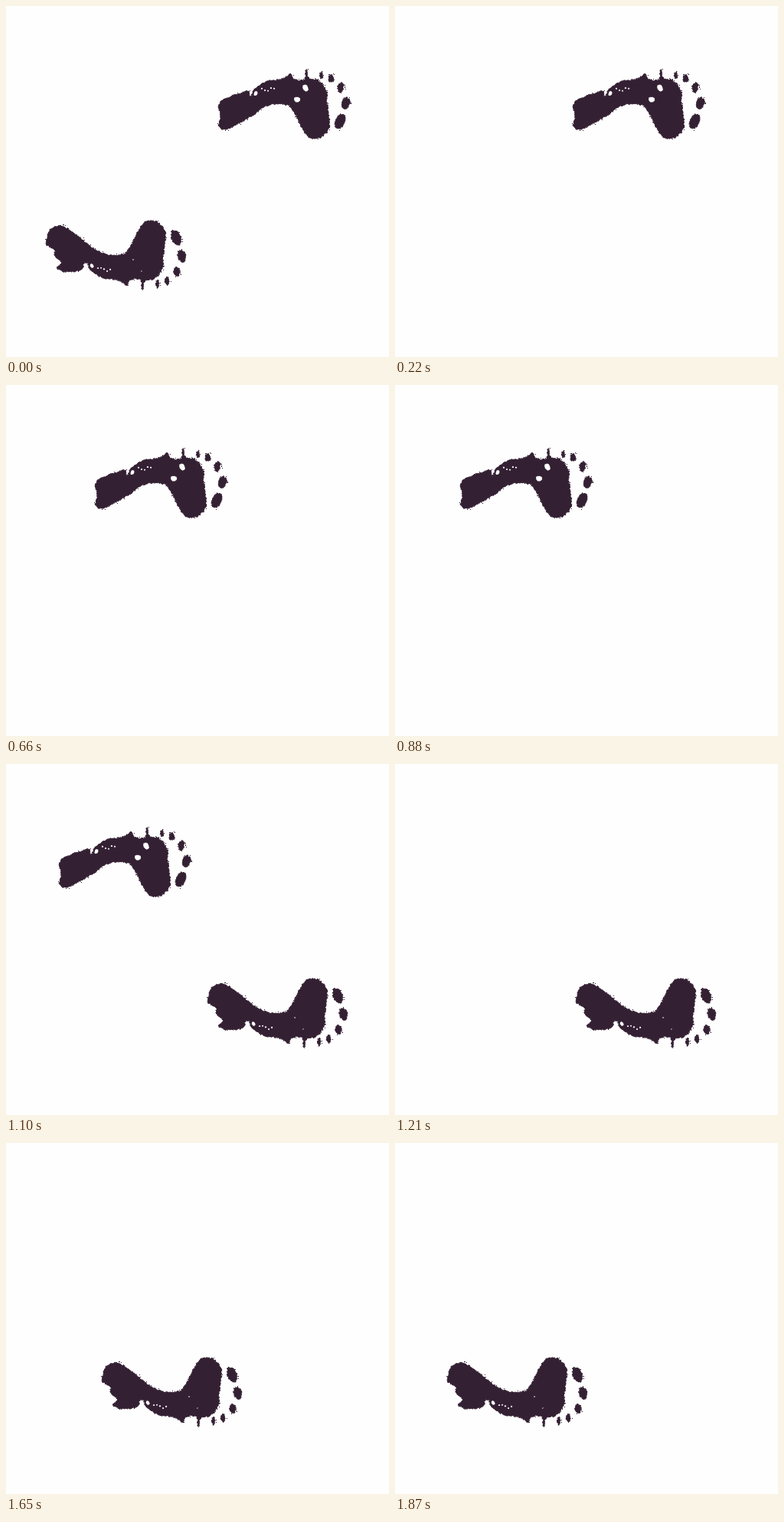
Animation of 500 by 458 pixels, one loop 1980 ms. Source, as an HTML page with a canvas:

```html
<!DOCTYPE html>
<html lang="en">
<head>
<meta charset="utf-8">
<title>Footprints</title>
<style>
html, body { margin: 0; width: 100%; height: 100%; overflow: hidden; background: #fefefe; }
canvas { display: block; }
</style>
</head>
<body>
<canvas id="stage" width="500" height="458"></canvas>
<script>
const STEP = 110, STEPS = 18, LAST_AGE = 10;
const WIDTH = 500, HEIGHT = 458;
const INK = '#342033', PAPER = '#fefefe';

// Both prints share the front of the sole; only the heels differ.
const FRONT = [321,117, 324,109, 340,99, 357,96, 367,92, 372,89, 377,96, 390,96,
  392,83, 396,95, 407,97, 418,110, 419,128, 422,155, 414,169, 402,173, 391,167,
  378,142, 369,130, 351,128, 334,133];

const feet = [
  {
    heel: [325,141, 300,155, 287,161, 278,157, 280,145, 278,130, 285,122, 315,111, 317,117],
    tear: 3.4, start: 0, flip: 1, x: 0, y: 0,
    speed: 20, gain: 1.25, brake: 5.54, drag: 12.4
  },
  {
    heel: [325,139, 306,154, 286,166, 271,160, 267,142, 277,136, 278,127, 286,118,
      281,111, 293,106, 312,109, 315,117],
    tear: .7, start: 9, flip: -1, x: 22, y: 453,
    speed: 25.1, gain: .35, brake: 7.6, drag: 11.3
  }
];

function seeded(seed) {
  let s = seed;
  return () => (s = s * 16807 % 2147483647) / 2147483647;
}

// Closed Catmull-Rom curve, sampled about once per pixel.
function spline(flat) {
  const n = flat.length / 2, out = [];
  const at = i => { i = (i + n) % n; return [flat[2 * i], flat[2 * i + 1]]; };
  for (let i = 0; i < n; i++) {
    const [a, b, c, d] = [at(i - 1), at(i), at(i + 1), at(i + 2)];
    const count = Math.ceil(Math.hypot(c[0] - b[0], c[1] - b[1]));
    for (let k = 0; k < count; k++) {
      const t = k / count;
      out.push([0, 1].map(j => b[j] + t / 2 * (c[j] - a[j]
        + t * (2 * a[j] - 5 * b[j] + 4 * c[j] - d[j]
        + t * (3 * (b[j] - c[j]) + d[j] - a[j])))));
    }
  }
  return out;
}

function ring(x, y, rx, ry = rx, tilt = 0) {
  const n = Math.max(8, Math.ceil(4 * (rx + ry)));
  const cos = Math.cos(tilt), sin = Math.sin(tilt);
  return Array.from({ length: n }, (_, i) => {
    const a = i / n * 2 * Math.PI, u = rx * Math.cos(a), v = ry * Math.sin(a);
    return [x + u * cos - v * sin, y + u * sin + v * cos];
  });
}

// Toes sit on a circle, wider apart and larger towards the big toe.
function toe(i) {
  const a = (-80 + 17 * i + 3 * i * i) * Math.PI / 180;
  return ring(405 + 38.5 * Math.cos(a), 128 + 38.5 * Math.sin(a),
    1.8 + i, 4.5 + .33 * i * i, .1 * i);
}

function printOf({ heel, tear }) {
  const sheet = document.createElement('canvas');
  sheet.width = WIDTH;
  sheet.height = HEIGHT;
  const g = sheet.getContext('2d'), random = seeded(69811);
  const jitter = size => (random() - .5) * size;

  const blot = (points, rough) => {
    g.beginPath();
    for (const [x, y] of points) g.lineTo(x + jitter(rough), y + jitter(rough));
    g.closePath();
    g.fill();
  };
  const inked = points => {
    blot(points, 2);
    g.stroke();
    for (const [x, y] of points) {
      if (random() < .2) g.fillRect(Math.round(x + jitter(4)), Math.round(y + jitter(4)), 1, 1);
    }
  };

  g.fillStyle = g.strokeStyle = INK;
  inked(spline([...FRONT, ...heel]));
  for (let i = 0; i < 5; i++) inked(toe(i));

  g.globalCompositeOperation = 'destination-out';
  blot(ring(380, 122, tear * 1.2, tear), .8);
  blot(ring(391, 107, tear, tear * 1.4, -.5), .8);
  blot(ring(326, 114, 2.2, 3, .5), .8);
  for (let i = 0; i < 5; i++) blot(ring(334 + 4 * i, 109 + jitter(5), 1.1), .4);
  return sheet;
}

// Speeds up slightly, then brakes.
function travel({ speed, gain, brake, drag }, age) {
  return speed * age + gain * age ** 2 - drag * Math.max(0, age - brake) ** 1.5;
}

const ctx = document.getElementById('stage').getContext('2d');
for (const foot of feet) foot.sheet = printOf(foot);
const begin = performance.now();

function draw() {
  const step = Math.floor((performance.now() - begin) / STEP) % STEPS;
  ctx.setTransform(1, 0, 0, 1, 0, 0);
  ctx.fillStyle = PAPER;
  ctx.fillRect(0, 0, WIDTH, HEIGHT);
  for (const foot of feet) {
    const age = (step - foot.start + STEPS) % STEPS;
    if (age > LAST_AGE) continue;
    ctx.setTransform(1, 0, 0, foot.flip, Math.round(foot.x - travel(foot, age)), foot.y);
    ctx.drawImage(foot.sheet, 0, 0);
  }
  requestAnimationFrame(draw);
}
draw();
</script>
</body>
</html>
```
